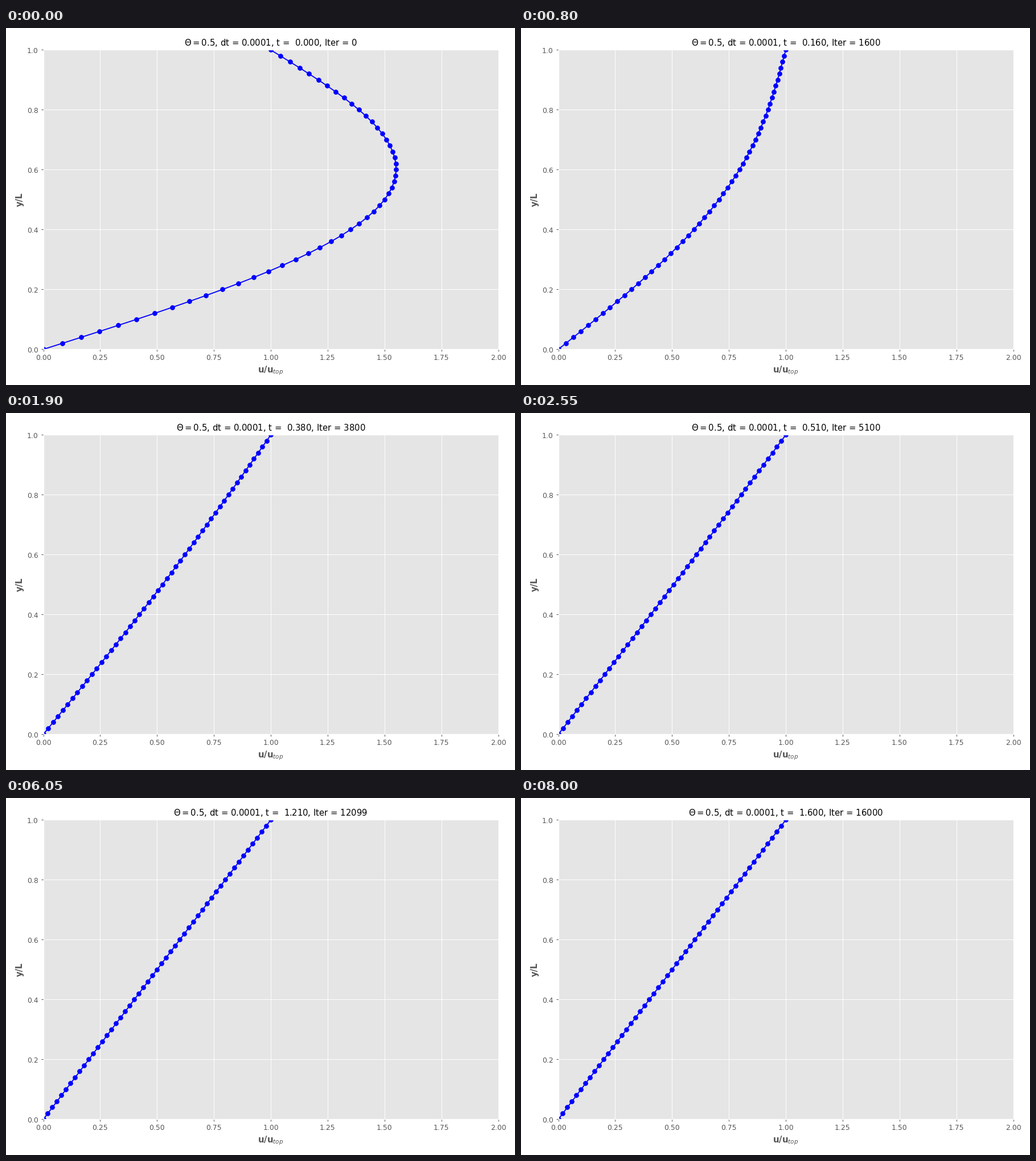
A matplotlib script for the animation above (8050 ms loop, 894x626 px).

```python
import numpy as np
import matplotlib.pyplot as plt
from matplotlib.animation import FuncAnimation

W, H, DPI = 894, 626, 89.4
LEFT, RIGHT, TOP, BOTTOM = 65.5, 864.5, 38.5, 563.5

THETA = 0.5
DT = 0.0001
STEPS = 100      # solver steps per frame
FRAMES = 161
INTERVAL = 50

plt.style.use("ggplot")
plt.rcParams["font.family"] = "DejaVu Sans"

fig = plt.figure(figsize=(W / DPI, (H + 0.01) / DPI), dpi=DPI, facecolor="white")
ax = fig.add_axes([LEFT / W, 1 - BOTTOM / H, (RIGHT - LEFT) / W, (BOTTOM - TOP) / H])
ax.set_xlim(0, 2)
ax.set_ylim(0, 1)
ax.set_xlabel(r"u/u$_{top}$", fontsize=12, weight="bold")
ax.set_ylabel("y/L", fontsize=12, weight="bold")

y = np.linspace(0, 1, 51)
line, = ax.plot([], [], "bo-")
title = ax.set_title("", fontsize=12, color="black")


def velocity(t):
    """Couette flow: linear profile plus a decaying sine mode."""
    return y + np.sin(np.pi * y) * np.exp(-np.pi**2 * t)


def update(i):
    t = i * STEPS * DT
    line.set_data(velocity(t), y)
    title.set_text(rf"$\Theta = {THETA}$, dt = {DT}, t = {t:6.3f}, Iter = {int(t / DT)}")
    return line, title


anim = FuncAnimation(fig, update, frames=FRAMES, interval=INTERVAL,
                     init_func=lambda: update(0), repeat=True, repeat_delay=0)
plt.show()
```
